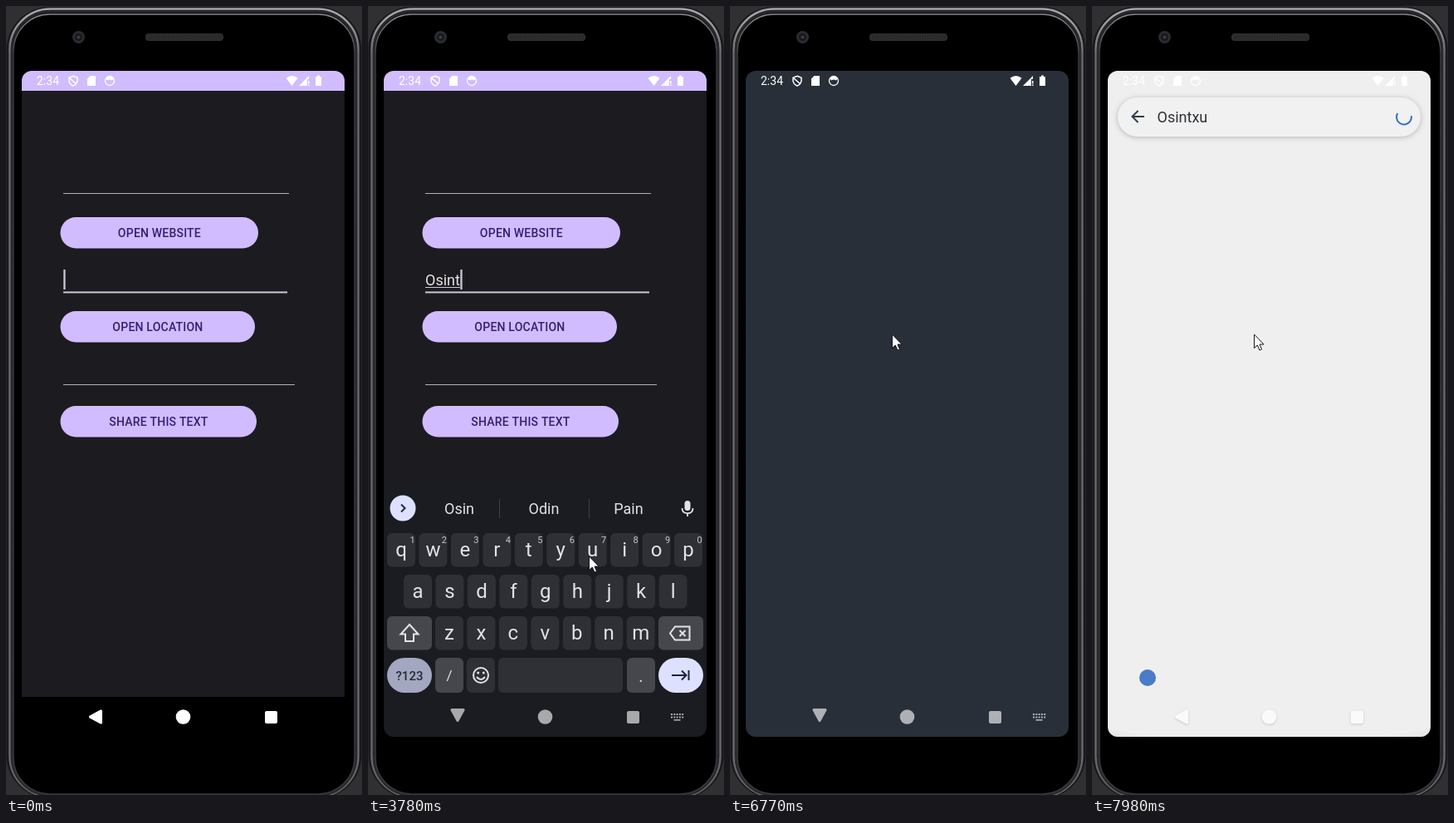
Recreate the animation shown at these times as an HTML page with a canvas. Size 429 px wide and 949 px high, loop 8000 ms.

```html
<!DOCTYPE html>
<html lang="en">
<head>
<meta charset="utf-8">
<title>Phone form</title>
<style>
html, body { margin: 0; width: 100%; height: 100%; overflow: hidden; background: #303032; }
canvas { display: block; }
</style>
</head>
<body>
<canvas id="stage" width="429" height="949"></canvas>
<script>
const c = document.getElementById('stage').getContext('2d');
const LOOP = 8000, TICK = 66.2;
const LILAC = '#d0bcff', INK = '#e3e2e8', DARK = '#1c1b1f', SPLASH = '#292f39';

const clamp = v => Math.max(0, Math.min(1, v));
const ramp = (t, a, b) => clamp((t - a) / (b - a));
const easeOut = p => 1 - (1 - p) ** 3;
const smooth = p => p * p * (3 - 2 * p);

function box(x, y, w, h, r, fill) {
  c.beginPath();
  c.roundRect(x, y, w, h, r);
  c.fillStyle = fill;
  c.fill();
}
function ring(x, y, w, h, r, color, lw) {
  c.beginPath();
  c.roundRect(x, y, w, h, r);
  c.strokeStyle = color;
  c.lineWidth = lw;
  c.stroke();
}
function dot(x, y, r, fill) {
  c.beginPath();
  c.arc(x, y, r, 0, 7);
  c.fillStyle = fill;
  c.fill();
}
function shape(x, y, d, fill, stroke, lw = 2) {
  const p = new Path2D(d);
  c.save();
  c.translate(x, y);
  if (fill) { c.fillStyle = fill; c.fill(p); }
  if (stroke) { c.strokeStyle = stroke; c.lineWidth = lw; c.stroke(p); }
  c.restore();
}
function text(s, x, y, size, color, align = 'left', weight = 400, gap = 0) {
  c.font = `${weight} ${size}px Roboto, Arial, sans-serif`;
  c.letterSpacing = gap + 'px';
  c.textAlign = align;
  c.fillStyle = color;
  c.fillText(s, x, y);
  return c.measureText(s).width;
}
// Metal edge: bright along the top, dimmer down the sides
function metal(top, side) {
  const g = c.createLinearGradient(0, 0, 0, 60);
  g.addColorStop(0, top);
  g.addColorStop(0.2, top);
  g.addColorStop(1, side);
  return g;
}

// Phone body; its foot runs past the stage
function phone() {
  c.fillStyle = '#303032';
  c.fillRect(0, 0, 429, 949);
  box(0.5, 1, 428, 952, 52, '#19191b');
  ring(4.5, 3.5, 420, 947.5, 49, metal('#a4a4a9', '#66676c'), 2.6);
  ring(7, 6.5, 415, 943, 46, '#29292c', 2.4);
  box(9, 9, 411, 939, 44, '#000');
  ring(9, 10, 411, 938, 44, metal('#85868b', '#3a3b40'), 1.4);
  dot(87.5, 37.5, 7.5, '#2b2c2f');
  dot(87.5, 37.5, 4.5, '#17181b');
  dot(87.5, 37.5, 2, '#3a3d44');
  box(168, 33, 94, 9, 4, '#2e2e30');
  c.fillStyle = '#1b1b1d';
  for (let x = 171; x < 260; x += 3)
    for (let y = 35; y < 41; y += 2) c.fillRect(x + (y % 4 > 2 ? 1 : 0), y, 1, 1);
}

function statusIcons() {
  const w = '#fff';
  text('2:34', 37, 95, 14, w);
  shape(81, 90, 'M0-5.8 L5-3.8 V0 Q4.5 4.2 0 6 Q-4.5 4.2-5 0 V-3.8Z M-4-3 L4 4', null, w, 1.5);
  shape(103, 90, 'M-1.5-6 H5 V6 H-5 V-2.5Z', w);
  c.beginPath();
  c.arc(125, 90, 5.5, 0, 7);
  c.strokeStyle = w;
  c.lineWidth = 1.3;
  c.stroke();
  shape(125, 90, 'M-5-2.5 Q0-9 5-2.5 L2.5-.5 Q0-2.5-2.5-.5Z', w);
  shape(344.5, 90, 'M0 6 L-7-3.2 Q0-9 7-3.2Z', w);
  shape(360, 90, 'M-7 6 L5-6 V-2 H3 V6Z M4 0 H5.5 V3.5 H4Z M4 4.5 H5.5 V6 H4Z', w);
  shape(376.5, 90, 'M-3.5-5 H-1.5 V-6.5 H1.5 V-5 H3.5 V6 H-3.5Z', w);
}

// turn: 0 = pointing left, 1 = pointing down
function navIcons(color, alpha, turn, keys) {
  c.save();
  c.globalAlpha = alpha;
  c.save();
  c.translate(108, 855 - 2 * turn);
  c.rotate(-turn * Math.PI / 2);
  c.fillStyle = color;
  c.fill(new Path2D('M-7.6-1.2 L5.8-8.4 Q8-9 8-7 V7 Q8 9 5.8 8.4 L-7.6 1.2 Q-8.6 0-7.6-1.2Z'));
  c.restore();
  dot(213.5, 855, 8.8, color);
  box(312, 848, 15, 15, 2, color);
  if (keys) {
    for (let i = 0; i < 5; i++) {
      c.fillRect(365 + i * 3.3, 851, 2, 2);
      c.fillRect(365 + i * 3.3, 854.5, 2, 2);
    }
    c.fillRect(368.5, 858, 8, 1.6);
  }
  c.restore();
}

function button(label, y, w, hit) {
  box(65.5, y, w - 0.5, 37.5, 18.75, LILAC);
  if (hit) {
    c.save();
    c.beginPath();
    c.roundRect(65.5, y, w - 0.5, 37.5, 18.75);
    c.clip();
    const r = 20 + 120 * hit, g = c.createRadialGradient(195, 391, 0, 195, 391, r);
    g.addColorStop(0, 'rgba(70,50,125,.18)');
    g.addColorStop(1, 'rgba(70,50,125,0)');
    c.fillStyle = g;
    c.fillRect(65, y, w, 38);
    c.restore();
  }
  text(label, 65 + w / 2 + 0.4, y + 24, 14, '#381e72', 'center', 500, 0.2);
}

const strokes = [[2960, 'O'], [3320, 'Os'], [3520, 'Osi'], [3720, 'Osin'],
  [3780, 'Osint'], [3980, 'Osintx'], [4180, 'Osintxu']];
const hints = [[2960, 'O Of On'], [3320, 'Os Is Us'], [3520, 'Osi Odin Pain'], [3720, 'Osin Odin Pain'],
  [3980, 'Osint Paint Point'], [4180, 'Osintx Paint Points'], [4380, 'Osintxu Painting']];
const latest = (list, t) => list.reduce((v, [at, s]) => t >= at ? s : v, '');

function caretOn(t) {
  if (t >= 2850 && t < 4280) return true;
  const base = t < 2850 ? 160 : 4280;
  const n = Math.floor((t - base) / 500);
  return t < 2850 ? n % 2 !== 0 : n % 2 === 0;
}

function form(t, s) {
  c.fillStyle = DARK;
  c.fillRect(19, 78, 389, 753);
  c.fillStyle = '#000';
  c.fillRect(19, 831, 389, 48);
  c.fillStyle = LILAC;
  c.fillRect(19, 78, 389, 24);
  c.fillStyle = '#b3b0b6';
  c.fillRect(69, 225, 272, 1);
  c.fillRect(69, 455, 279, 1);
  c.fillStyle = '#cac5d8';
  c.fillRect(69, 343.4, 270, 2);
  button('OPEN WEBSITE', 254, 239);
  button('OPEN LOCATION', 367, 235, t >= 5640 ? ramp(s, 5640, 6000) : 0);
  button('SHARE THIS TEXT', 481, 237);
  const typed = latest(strokes, t);
  const w = typed ? text(typed, 69, 336, 18, '#e6e1e5') : 0;
  c.fillStyle = '#cac6dc';
  if (w) c.fillRect(69, 338, w, 1);
  if (caretOn(t)) c.fillRect(69.3 + Math.round(w), 317, 2.3, 24);
}

function mic() {
  box(381.5, 595, 7, 12, 3.5, INK);
  shape(385, 604, 'M-6.5 0 Q-6.5 6.2 0 6.2 Q6.5 6.2 6.5 0 M0 6 V10', null, INK, 1.8);
}

function toolbar() {
  ring(90, 597.5, 14, 14.5, 1.5, INK, 2);
  box(93.5, 595, 7, 5, 1, INK);
  shape(97, 604, 'M-4-1 H4 M-4 2 H4 M-4 5 H2', null, INK, 1.5);
  c.save();
  c.translate(151.5, 604);
  for (let i = 0; i < 6; i++) {
    c.rotate(Math.PI / 3);
    box(-2.4, -9, 4.8, 5, 1, INK);
  }
  c.restore();
  c.beginPath();
  c.arc(151.5, 604, 4.8, 0, 7);
  c.strokeStyle = INK;
  c.lineWidth = 3.4;
  c.stroke();
  shape(206.5, 604, 'M0 8.5 A8.5 8.5 0 1 1 8.5-1 Q8.5 4 4 4 H2 Q0 4 1 6 Q1.5 8.5 0 8.5Z', INK);
  for (const [x, y] of [[-5, 0], [-2.5, -4], [2.5, -4], [5, 0]]) dot(206.5 + x, 604 + y, 1.4, '#1b1c21');
  shape(261, 604, 'M7 0 V-7 H-7 V7 H0 M-1-2 L6 6', null, INK, 2);
  shape(261, 604, 'M8 1 V9 H0Z', INK);
  c.fillStyle = '#3c3d43';
  c.fillRect(295, 593, 1, 23);
  for (const x of [323.5, 329, 334.5]) dot(x, 604.5, 1.8, INK);
}

function paintEmoji() {
  c.lineCap = 'round';
  shape(290, 604, 'M-1 1 L8-8', null, '#3f86c4', 3.5);
  shape(290, 604, 'M-3.5 3.5 L-.5 .5', null, '#d9a54c', 4.5);
  shape(290, 604, 'M-3 1 L0 4 Q-3 9-9 9 Q-7 4-3 1Z', '#7d4a30');
  c.lineCap = 'butt';
  shape(339, 604, 'M-9 2 Q-10-8 2-8.5 Q11-7 9.5 0 Q8 3 4 2.5 Q1 4 4 6 Q4 9-1 8.5 Q-8 8-9 2Z', '#d89a58');
  ['#4f9be0', '#58b368', '#f0cf4a', '#e25547'].forEach((k, i) =>
    dot(339 - 5 + i * 3.4, 604 + [2, -3, -5, -3][i], 2, k));
}

function suggestions(str) {
  const words = str.split(' ');
  words.forEach((w, i) => text(w, 110 + 102 * i, 611, 18, INK, 'center'));
  c.fillStyle = '#404147';
  c.fillRect(158, 593, 1, 23);
  c.fillRect(266, 593, 1, 23);
  if (words.length < 3) {
    c.fillRect(314, 593, 1, 23);
    paintEmoji();
  }
}

function keyboard(t) {
  const key = '#2e3036', mod = '#46474d', upper = t >= 2850 && t < 3070;
  c.fillStyle = '#1b1c21';
  c.fillRect(19, 580, 389, 370);
  const hint = latest(hints, t);
  dot(42, 604, 15.5, '#dde1ff');
  shape(42, 604, hint ? 'M-2-4.5 L2.5 0 L-2 4.5' : 'M2-4.5 L-2.5 0 L2 4.5', null, '#25283a', 2);
  if (hint) suggestions(hint); else toolbar();
  mic();
  ['qwertyuiop', 'asdfghjkl', 'zxcvbnm'].forEach((row, r) => {
    [...row].forEach((ch, i) => {
      const x = [40, 60, 98][r] + i * 38.45, y = 634 + r * 50;
      box(x - 17, y, 34, 40.5, 6, key);
      text(upper ? ch.toUpperCase() : ch, x, y + 28, 24, INK, 'center');
      if (!r) text((i + 1) % 10, x + 13.5, y + 12, 11, '#c6c6cf', 'center');
    });
  });
  box(23, 734, 54, 40.5, 6, mod);
  box(350, 734, 54, 40.5, 6, mod);
  shape(50, 754.5, 'M0-10.5 L10.5 1 H5 V9.5 H-5 V1 H-10.5Z', upper && INK, INK, 2);
  shape(376, 754.5, 'M-12 0 L-6-8 H11.5 V8 H-6Z M-.5-3.5 L6.5 3.5 M6.5-3.5 L-.5 3.5', null, INK, 2);
  box(23, 784, 54, 42, 21, '#a3a7bf');
  text('?123', 50, 811, 15, '#272a3c', 'center', 500);
  box(81, 784, 34, 42, 6, mod);
  text('/', 98, 811, 17, INK, 'center');
  box(119, 784, 34, 42, 6, key);
  shape(136, 805, 'M9 0 A9 9 0 1 1-9 0 A9 9 0 1 1 9 0 M-5 2 Q0 8 5 2', null, INK, 2);
  dot(132.7, 802, 1.5, INK);
  dot(139.3, 802, 1.5, INK);
  box(157, 784, 150, 42, 6, key);
  box(312, 784, 34, 42, 6, mod);
  text('.', 329, 813, 20, INK, 'center');
  box(350, 784, 54, 42, 21, '#dde1ff');
  shape(376, 805, 'M-10 0 H7 M2-5.5 L7.5 0 L2 5.5 M10.5-6 V6', null, '#20233a', 2);
}

// Results page lit from above, with a dark curved falloff at the foot
function results(s) {
  const lit = s < 7687 ? 0.3 + 0.4 * ramp(s, 7555, 7687) : 0.7 + 0.3 * ramp(s, 7687, 7900);
  const r = 940 + 135 * (s - 7687) / 264;
  const g = c.createRadialGradient(213, -190, r, 213, -190, r + 150);
  g.addColorStop(0, `rgba(239,239,239,${lit})`);
  g.addColorStop(1, `rgba(239,239,239,${lit * 0.1})`);
  c.fillStyle = g;
  c.fillRect(19, 78, 389, 801);
  const shown = ramp(s, 7720, 7900);
  c.globalAlpha = 1 - shown;
  c.fillStyle = '#111217';
  c.fillRect(19, 79, 389, 24);
  c.globalAlpha = shown;
  if (shown > 0) {
    c.shadowColor = 'rgba(0,0,0,.24)';
    c.shadowBlur = 6;
    c.shadowOffsetY = 1;
    box(31, 110, 365, 47, 23.5, '#f1f1f1');
    c.shadowColor = 'transparent';
    shape(55, 133, 'M8 0 H-6 M.5-7 L-6.5 0 L.5 7', null, '#303c48', 2);
    text('Osintxu', 78.5, 140, 18, '#2d3136');
    const a = (s - 7951) / 150 - 0.15;
    c.beginPath();
    c.arc(376, 133.5, 9, a, a + 3.8);
    c.strokeStyle = '#3470c6';
    c.lineWidth = 2;
    c.stroke();
    dot(67, 808, 10, '#4a7bc8');
  }
  c.globalAlpha = 1;
}

const track = [[140, 328, 845], [420, 215, 650], [680, 85, 440], [800, 66, 386], [930, 131, 330], [1000, 131, 325],
  [2010, 131, 325], [2180, 266, 662], [4720, 266, 662], [5490, 195, 395], [LOOP, 195, 395]];
function pointer(t, s) {
  if (t < 140) return;
  const i = Math.max(1, track.findIndex(k => k[0] >= s));
  const [a, b] = [track[i - 1], track[i]];
  const p = smooth(ramp(s, a[0], b[0]));
  const x = a[1] + (b[1] - a[1]) * p, y = a[2] + (b[2] - a[2]) * p;
  if ((t >= 1140 && t < 1330) || (t >= 5640 && t < 5840)) dot(x, y, 12.3, 'rgba(218,210,70,.8)');
  shape(x + 0.5, y, 'M0 0 V16.5 L3.8 13 L6.4 19 L9 17.9 L6.5 12 H11.6Z', '#fff', '#15151c', 1);
}

function draw(t) {
  const s = Math.max(0, 140 + TICK * Math.floor((t - 134) / TICK));
  c.lineJoin = 'miter';
  phone();
  c.save();
  c.beginPath();
  c.roundRect(19, 78, 389, 801, 12);
  c.clip();
  const up = ramp(s, 1530, 1860), open = ramp(s, 6020, 6430);
  if (open < 1) {
    form(t, s);
    if (up > 0) {
      c.save();
      c.globalAlpha = Math.min(1, 0.5 + 0.8 * up);
      c.translate(0, 320 * (1 - easeOut(up)));
      keyboard(t);
      c.restore();
    }
  }
  if (open > 0) {
    c.globalAlpha = Math.min(1, open * 2);
    c.fillStyle = SPLASH;
    c.fillRect(19, 78 + 80 * (1 - easeOut(open)), 389, 801);
    c.globalAlpha = 1;
  }
  const late = t >= 7580, done = t >= 7840;
  if (late) results(s);
  statusIcons();
  if (done) {
    c.shadowColor = 'rgba(0,0,0,.16)';
    c.shadowBlur = 3;
  }
  navIcons(done ? '#fafafa' : late ? '#c4c5c7' : '#fff', up > 0 && !late ? 0.62 : 1,
    done ? 0 : ramp(s, 1680, 1860), up > 0.6 && !done);
  c.shadowColor = 'transparent';
  c.restore();
  pointer(t, s);
}

const start = performance.now();
function loop() {
  draw((performance.now() - start) % LOOP);
  requestAnimationFrame(loop);
}
loop();
</script>
</body>
</html>
```
